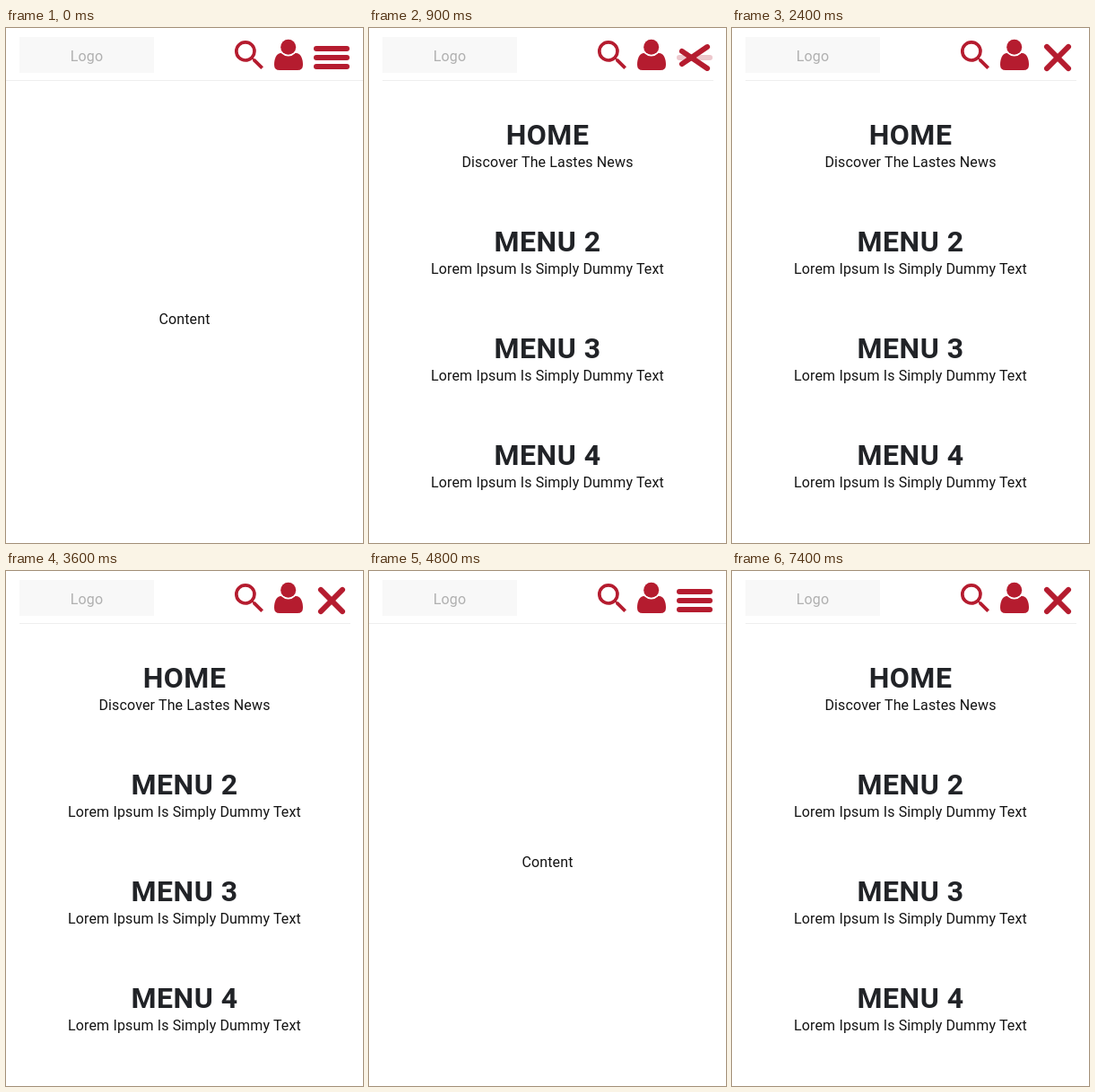
Recreate the animation shown at these times as an HTML page. Size 398 by 574 pixels, loop 8 s.

```html
<!DOCTYPE html>
<html lang="en">
<head>
<meta charset="utf-8">
<title>Mobile menu</title>
<style>
  html, body { margin: 0; width: 100%; height: 100%; overflow: hidden; background: #fff; }
  svg { display: block; }
  text { font: 16px Roboto, sans-serif; letter-spacing: .14px; text-anchor: middle; fill: #141414; }
  .title { font-size: 32px; font-weight: 700; letter-spacing: .5px; fill: #212327; }
  .logo { fill: #b0b0b0; }
  .line { fill: #eee; }
  .icon { fill: #b51c2f; }
</style>
</head>
<body>
<svg width="398" height="574" viewBox="0 0 398 574">
  <defs>
    <clipPath id="clip"><rect id="clipRect" width="398" height="50"/></clipPath>
  </defs>
  <rect width="398" height="574" fill="#fff"/>
  <text x="199" y="330">Content</text>

  <rect id="panel" width="398" height="58" fill="#fff"/>
  <rect id="bottomLine" class="line" y="58" width="398" height="1"/>
  <g id="menu" clip-path="url(#clip)">
    <rect id="topLine" class="line" x="15" width="369" height="1"/>
    <g id="items"></g>
  </g>

  <rect x="15" y="10" width="150" height="40" fill="#f8f8f8"/>
  <text class="logo" x="90" y="37">Logo</text>

  <g class="icon">
    <path transform="translate(255 14) scale(1.83) translate(-3 -3)"
      d="M15.5 14h-.79l-.28-.27A6.47 6.47 0 0 0 16 9.5 6.5 6.5 0 1 0 9.5 16c1.61 0 3.09-.59 4.23-1.57l.27.28v.79l5 4.99L20.49 19zM9.5 14a4.5 4.5 0 1 1 0-9 4.5 4.5 0 0 1 0 9z"/>
    <path d="M306 28C301 28.5 299 35 299 41Q299 47 305 47H325Q331 47 331 41C331 35 329 28.5 324 28Z"/>
    <circle cx="314.7" cy="21.3" r="10.3" fill="#fff"/>
    <circle cx="314.7" cy="21.3" r="8.5"/>
    <g id="bars">
      <rect x="-20" y="-3" width="40" height="6" rx="3"/>
      <rect x="-20" y="-3" width="40" height="6" rx="3"/>
      <rect x="-20" y="-3" width="40" height="6" rx="3"/>
    </g>
  </g>
</svg>
<script>
const LOOP = 8000, STEP = 100, SLIDE = 300, MORPH = 500;
const MENU_HEIGHT = 662, TOP = 50;
const toggles = [{ at: 570, open: true }, { at: 3590, open: false }, { at: 6597, open: true }];
const entries = [
  ['HOME', 'Discover The Lastes News'],
  ...[2, 3, 4].map(n => ['MENU ' + n, 'Lorem Ipsum Is Simply Dummy Text'])
];

const $ = id => document.getElementById(id);
const set = (el, name, value) => el.setAttribute(name, value);
const clamp = x => Math.min(1, Math.max(0, x));
const swing = x => 0.5 - Math.cos(Math.PI * x) / 2;

// cubic-bezier(.42, 0, .58, 1), solved by bisection
function easeInOut(x) {
  const curve = (u, a, b) => 3 * u * (1 - u) ** 2 * a + 3 * u * u * (1 - u) * b + u ** 3;
  let low = 0, high = 1;
  for (let i = 0; i < 24; i++) {
    const mid = (low + high) / 2;
    if (curve(mid, 0.42, 0.58) < x) low = mid; else high = mid;
  }
  return curve((low + high) / 2, 0, 1);
}

function openness(t, duration, ease) {
  const last = toggles.filter(toggle => toggle.at <= t).pop();
  if (!last) return 0;
  const p = ease(clamp((t - last.at) / duration));
  return last.open ? p : 1 - p;
}

$('items').innerHTML = entries.map(([title, note], i) => `
  <text class="title" x="199" y="${130 + 119 * i}">${title}</text>
  <text x="199" y="${155 + 119 * i}">${note}</text>`).join('');

function drawMenu(p) {
  const height = Math.round(MENU_HEIGHT * p);
  set($('menu'), 'visibility', p > 0 ? 'visible' : 'hidden');
  set($('clipRect'), 'height', TOP + height);
  set($('panel'), 'height', TOP + 8 + height);
  set($('bottomLine'), 'y', TOP + 8 + height);
  set($('topLine'), 'y', Math.round(TOP + 8 * p));
  set($('items'), 'transform', `translate(0 ${Math.round(-23 * (1 - p))})`);
}

function drawBars(p) {
  [...$('bars').children].forEach((bar, i) => {
    const side = i - 1;
    set(bar, 'transform', `translate(363 ${33 + side * 10 * (1 - p)}) rotate(${side * 45 * p})`);
  });
  set($('bars').children[1], 'opacity', 1 - p);
}

function render(time) {
  const t = Math.floor((time % LOOP) / STEP) * STEP;
  drawMenu(openness(t, SLIDE, swing));
  drawBars(openness(t, MORPH, easeInOut));
}

const start = performance.now();
function tick() {
  render(performance.now() - start);
  requestAnimationFrame(tick);
}
tick();
</script>
</body>
</html>
```
